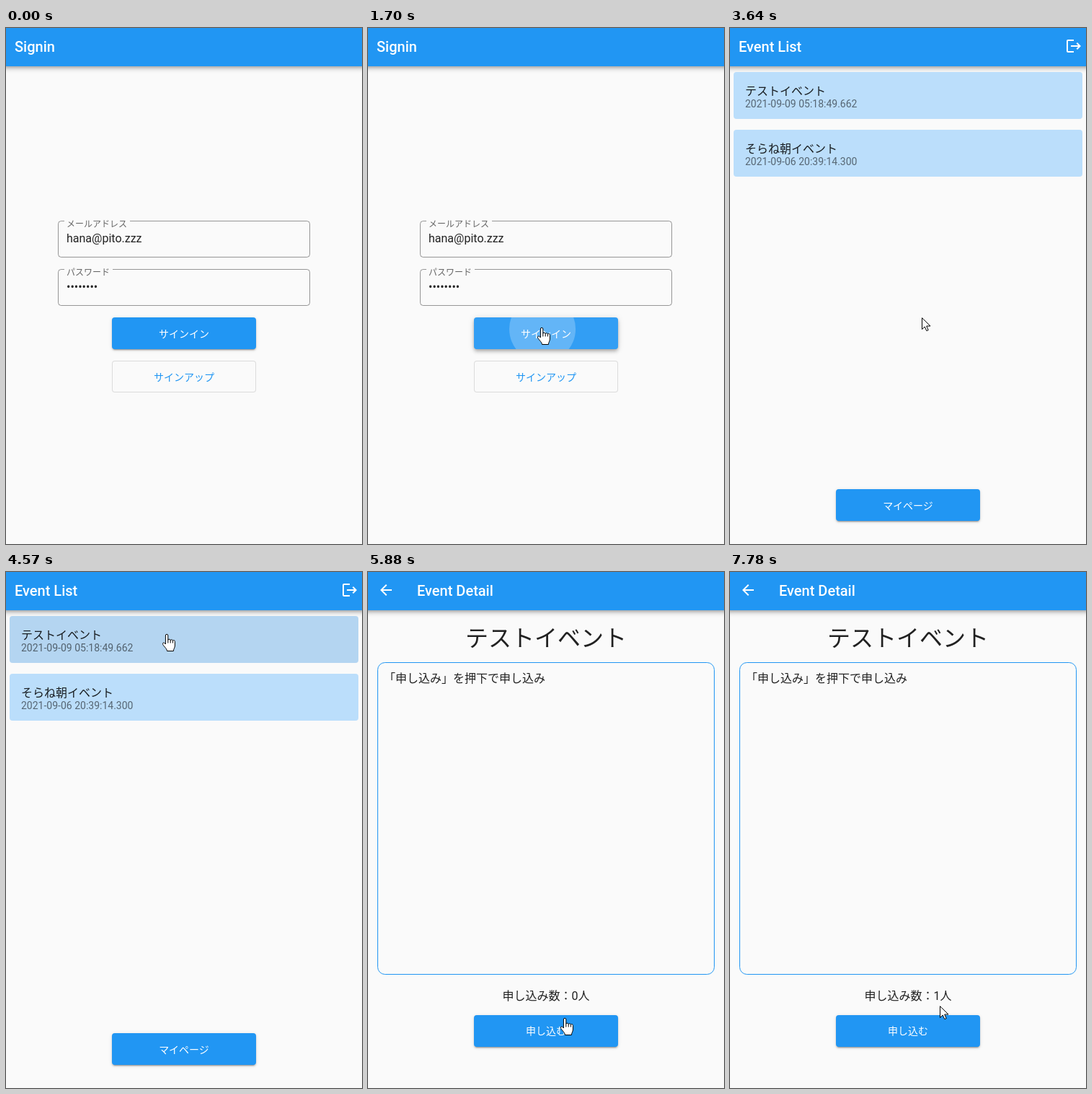
An HTML page that plays this animation: 494x715 px, repeating every 8 s.

```html
<!DOCTYPE html>
<html lang="ja">
<head>
<meta charset="utf-8">
<title>Event sign-up</title>
<style>
html, body { margin: 0; width: 100%; height: 100%; overflow: hidden; background: #fafafa; }
body { position: relative; font-family: Roboto, "Noto Sans CJK JP", "Noto Sans CJK", sans-serif; }
.page, svg { position: absolute; left: 0; top: 0; width: 494px; height: 715px; }
.page { background: #fafafa; }
svg { overflow: visible; pointer-events: none; }
.bar { position: absolute; left: -4px; right: -4px; top: -3px; height: 56px; background: #2196f3; }
.bar, .fill.hover { box-shadow: 0 2px 4px -1px #0003, 0 4px 5px #00000024, 0 1px 10px #0000001f; }
.hit { position: absolute; left: 147px; width: 200px; height: 44px; border-radius: 4px; overflow: hidden; }
.fill { background: #2196f3; box-shadow: 0 3px 1px -2px #0003, 0 2px 2px #00000024, 0 1px 5px #0000001f; --ink: #fff; --tint: .08; }
.line { box-shadow: inset 0 0 0 1px #0000001f; --ink: #2196f3; --tint: .04; }
.card { left: 5px; width: 484px; height: 65px; background: #bbdefb; --ink: #000; --tint: .04; }
.hit::before { content: ""; position: absolute; inset: 0; background: var(--ink); opacity: 0; }
.hit.hover::before { opacity: var(--tint); }
.hit i { position: absolute; border-radius: 50%; background: var(--ink); transform: translate(-50%, -50%); }
text { fill: #000000de; font-size: 16px; }
.title { fill: #fff; font-size: 20px; font-weight: 500; }
.label { fill: #0009; font-size: 12px; }
.btn { fill: #fff; font-size: 14px; font-weight: 500; }
.btn, .mid { text-anchor: middle; }
.sub { fill: #0000008a; font-size: 14px; }
.count { font-family: Roboto, "Noto Sans CJK SC", "Noto Sans CJK", sans-serif; }
.icon { fill: #fff; }
.box { fill: none; stroke: #0006; }
</style>
</head>
<body>
<div class="page" id="signin">
  <div class="bar"></div>
  <div class="hit fill" style="top:401px"><i></i></div>
  <div class="hit line" style="top:461px"><i></i></div>
  <svg>
    <text class="title" x="12" y="33">Signin</text>
    <rect class="box" x="72.5" y="267.5" width="349" height="50" rx="4"/>
    <rect class="box" x="72.5" y="334.5" width="349" height="50" rx="4"/>
    <path fill="#fafafa" d="M81 266h91v3h-91zM81 333h67v3h-67z"/>
    <text class="label" x="84" y="275.5">メールアドレス</text>
    <text x="84" y="297">hana@pito.zzz</text>
    <text class="label" x="84" y="342.5">パスワード</text>
    <text x="84" y="364">••••••••</text>
    <text class="btn" x="247" y="429">サインイン</text>
    <text class="btn" x="247" y="489" style="fill:#2196f3">サインアップ</text>
  </svg>
</div>

<div class="page" id="list">
  <div class="bar"></div>
  <div id="cards">
    <div class="hit card" id="first" style="top:61px"><i></i></div>
    <div class="hit card" style="top:141px"><i></i></div>
  </div>
  <div class="hit fill" style="top:638.5px"><i></i></div>
  <svg>
    <text class="title" x="12" y="33">Event List</text>
    <path class="icon" transform="translate(465 13)" d="M17 7l-1.41 1.41L18.17 11H8v2h10.17l-2.58 2.58L17 17l5-5zM4 5h8V3H4c-1.1 0-2 .9-2 2v14c0 1.1.9 2 2 2h8v-2H4V5z"/>
    <g id="rows">
      <text x="21" y="93">テストイベント</text>
      <text class="sub" x="21" y="110">2021-09-09 05:18:49.662</text>
      <text x="21" y="173">そらね朝イベント</text>
      <text class="sub" x="21" y="190">2021-09-06 20:39:14.300</text>
    </g>
    <circle id="spinner" cx="247" cy="342" r="18" pathLength="360" fill="none" stroke="#2196f3" stroke-width="4"/>
    <text class="btn" x="247" y="667">マイページ</text>
  </svg>
</div>

<div class="page" id="detail">
  <div class="bar"></div>
  <div class="hit fill" style="top:613.5px"><i></i></div>
  <svg>
    <path class="icon" transform="translate(13 13)" d="M20 11H7.83l5.59-5.59L12 4l-8 8 8 8 1.41-1.41L7.83 13H20z"/>
    <text class="title" x="68" y="33">Event Detail</text>
    <text class="mid" x="247" y="103" style="font-size:32px">テストイベント</text>
    <rect class="box" x="13.5" y="125.5" width="467" height="432" rx="10" style="stroke:#2196f3"/>
    <text x="22" y="153">「申し込み」を押下で申し込み</text>
    <text class="mid count" x="247" y="593">申し込み数：<tspan id="count">0</tspan>人</text>
    <text class="btn" x="247" y="641">申し込む</text>
  </svg>
</div>

<svg>
  <g id="cursor" fill="#fff" stroke="#000" stroke-linejoin="round">
    <path id="arrow" d="M.5.7V16.5L4.2 13L6.8 18.6L9.2 17.6L6.7 12H12Z"/>
    <path id="hand" d="M-1.6 14V2a1.6 1.6 0 0 1 3.4 0V8.5c0-2 3.4-1.7 3.4.4c0-1.8 3.2-1.4 3.2.6c0-1.5 3-1.2 3 .8V16c0 3-2 4.5-2 7.5H.5C.5 20-5.5 16-5.5 13.5c0-2 2.4-2 3.9.5ZM1.8 8.5v4M5.2 9v3.5M8.4 9.5v3"/>
  </g>
</svg>

<script>
const $ = id => document.getElementById(id);
const show = (el, on) => el.style.visibility = on ? 'inherit' : 'hidden';
const clamp = v => Math.max(0, Math.min(1, v));

// Bursts of screen updates: start, end, number of steps
const bursts = [
  [0, 0, 1], [760, 1320, 8], [1550, 2100, 8], [2560, 2810, 4], [3640, 3740, 2], [3970, 4570, 9],
  [4720, 4880, 3], [5110, 5880, 11], [5960, 6690, 10], [6770, 6770, 1], [7150, 7150, 1], [7460, 7780, 5]
];
// Cursor stops: time, x, y
const stops = [
  [760, 416, 698], [1320, 241, 415], [3600, 241, 415], [3640, 266, 401], [3740, 262, 416], [3890, 262, 416],
  [4210, 223, 86], [5030, 223, 86], [5880, 273, 618], [7380, 273, 618], [7780, 291, 601]
];

const hits = [...document.querySelectorAll('.hit')].map(el => ({
  el, page: el.closest('.page').id, ink: el.querySelector('i'),
  x: el.offsetLeft, y: el.offsetTop, w: el.offsetWidth, h: el.offsetHeight
}));
// Clicks: target, time, speed
const clicks = [[0, 1550, 1], [2, 4210, 1.4], [5, 6180, 1]];

function snap(t) {
  const [start, end, n] = bursts.findLast(b => b[0] <= t);
  const gap = (end - start) / (n - 1) || 1;
  return start + gap * Math.min(n - 1, Math.floor((t - start) / gap + .12));
}

function cursorAt(t) {
  const i = stops.findLastIndex(s => s[0] <= t);
  if (i < 0) return stops[0].slice(1);
  const [t0, x0, y0] = stops[i], [t1, x1, y1] = stops[i + 1] || [t0 + 1, x0, y0];
  const p = clamp((t - t0) / (t1 - t0)), s = p * p * (3 - 2 * p);
  return [x0 + (x1 - x0) * s, y0 + (y1 - y0) * s];
}

const inside = (h, page, [x, y]) =>
  h.page === page && x >= h.x && x < h.x + h.w && y >= h.y && y < h.y + h.h;

function ripple([index, start, speed], t) {
  const { ink, x, y } = hits[index], dt = (t - start) * speed;
  const [cx, cy] = cursorAt(start + 1);
  const r = dt < 110 ? .11 * dt + 4 : Math.min(12 + (dt - 110) * .72, 280);
  ink.style.cssText = `left:${cx + 1 - x}px;top:${cy + 2 - y}px;width:${2 * r}px;height:${2 * r}px;` +
    `opacity:${dt < 0 ? 0 : clamp((500 - dt) / 200) * (index === 2 ? .1 : .24)}`;
}

function draw(time) {
  const t = snap(time);
  const page = t < 2550 ? 'signin' : t < 4700 ? 'list' : 'detail';
  show($('signin'), page === 'signin');
  show($('list'), page !== 'signin');
  show($('detail'), page === 'detail');

  const loaded = t >= 2800, wait = t - 2560;
  show($('cards'), loaded);
  show($('rows'), loaded);
  show($('spinner'), !loaded && wait >= 0);
  $('spinner').setAttribute('stroke-dasharray', `${Math.max(0, 18 + .4 * wait)} 360`);
  $('spinner').setAttribute('transform', `rotate(${.16 * wait - 78} 247 342)`);

  const p = clamp((t - 4569) / 300);
  $('detail').style.opacity = p ** 1.7;
  $('detail').style.transform = p < 1 ? `translateY(${179 * (1 - p) ** 2.36}px)` : 'none';
  $('count').textContent = t < 7150 ? 0 : 1;

  const pos = cursorAt(t), earlier = cursorAt(t - 50);
  const over = hits.some(h => inside(h, page, pos));
  hits.forEach(h => h.el.classList.toggle('hover', t >= 760 && inside(h, page, earlier)));
  clicks.forEach(c => ripple(c, t));
  show($('cursor'), t >= 760);
  show($('hand'), over);
  show($('arrow'), !over);
  $('cursor').setAttribute('transform', `translate(${pos.map(Math.round)})`);
}

const begin = performance.now();
(function loop() {
  draw((performance.now() - begin) % 8000);
  requestAnimationFrame(loop);
})();
</script>
</body>
</html>
```
